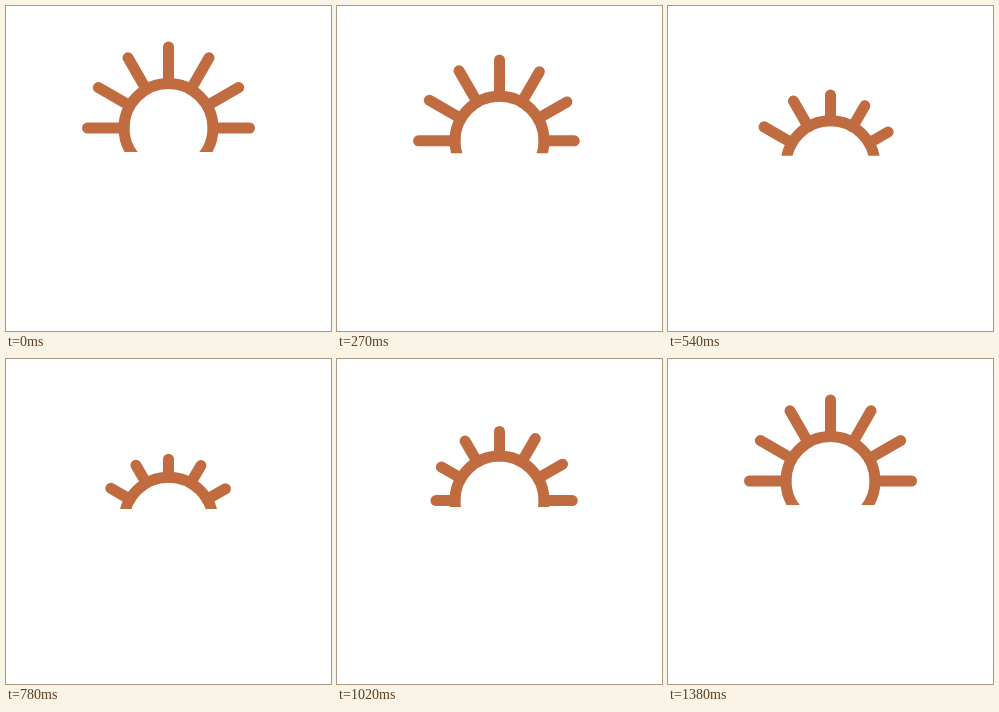
These frames come from a looping animation (325x325 px, 1.5 s). An HTML page with a canvas:

```html
<!DOCTYPE html>
<html lang="en">
<head>
<meta charset="utf-8">
<title>Sun</title>
<style>
  html, body { margin: 0; width: 100%; height: 100%; overflow: hidden; background: #fff; }
  canvas { display: block; width: 325px; height: 325px; }
</style>
</head>
<body>
<canvas id="stage" width="325" height="325"></canvas>
<script>
const ctx = document.getElementById('stage').getContext('2d');
const LOOP = 1500, STEP = 30;
const CX = 162.5, TOP_Y = 122, DROP = 43;
const RING = 44.5, LINE = 11, RAY_LONG = 81;

function ease(t, start, end) {
  const x = Math.min(1, Math.max(0, (t - start) / (end - start)));
  return x * x * (3 - 2 * x);
}

// Rises from 0 to 1 and falls back to 0.
const swing = (t, start, peak, end) => ease(t, start, peak) - ease(t, peak, end);

function draw(t) {
  const sink = swing(t, 30, 692, 1310);
  const cy = TOP_Y + DROP * sink;

  ctx.fillStyle = '#fff';
  ctx.fillRect(0, 0, 325, 325);
  ctx.save();
  ctx.beginPath();
  ctx.rect(0, 0, 325, 146 + 4.3 * sink);
  ctx.clip();

  ctx.strokeStyle = '#c06c40';
  ctx.lineWidth = LINE;
  ctx.lineCap = 'round';
  ctx.beginPath();
  ctx.arc(CX, cy, RING, 0, 2 * Math.PI);
  ctx.stroke();

  // Rays shrink one after another, right to left, and regrow together.
  for (let i = 0; i < 7; i++) {
    const angle = i * Math.PI / 6;
    const delay = i * 60;
    const shortest = i % 3 ? 64.5 : 62.5;
    const length = RAY_LONG - (RAY_LONG - shortest) * swing(t, 60 + delay, 600 + delay, 1380);
    const dx = Math.cos(angle), dy = -Math.sin(angle);
    ctx.beginPath();
    ctx.moveTo(CX + RING * dx, cy + RING * dy);
    ctx.lineTo(CX + length * dx, cy + length * dy);
    ctx.stroke();
  }
  ctx.restore();
}

const origin = performance.now();
function tick() {
  const t = (performance.now() - origin) % LOOP;
  draw(Math.floor(t / STEP) * STEP);
  requestAnimationFrame(tick);
}
tick();
</script>
</body>
</html>
```
